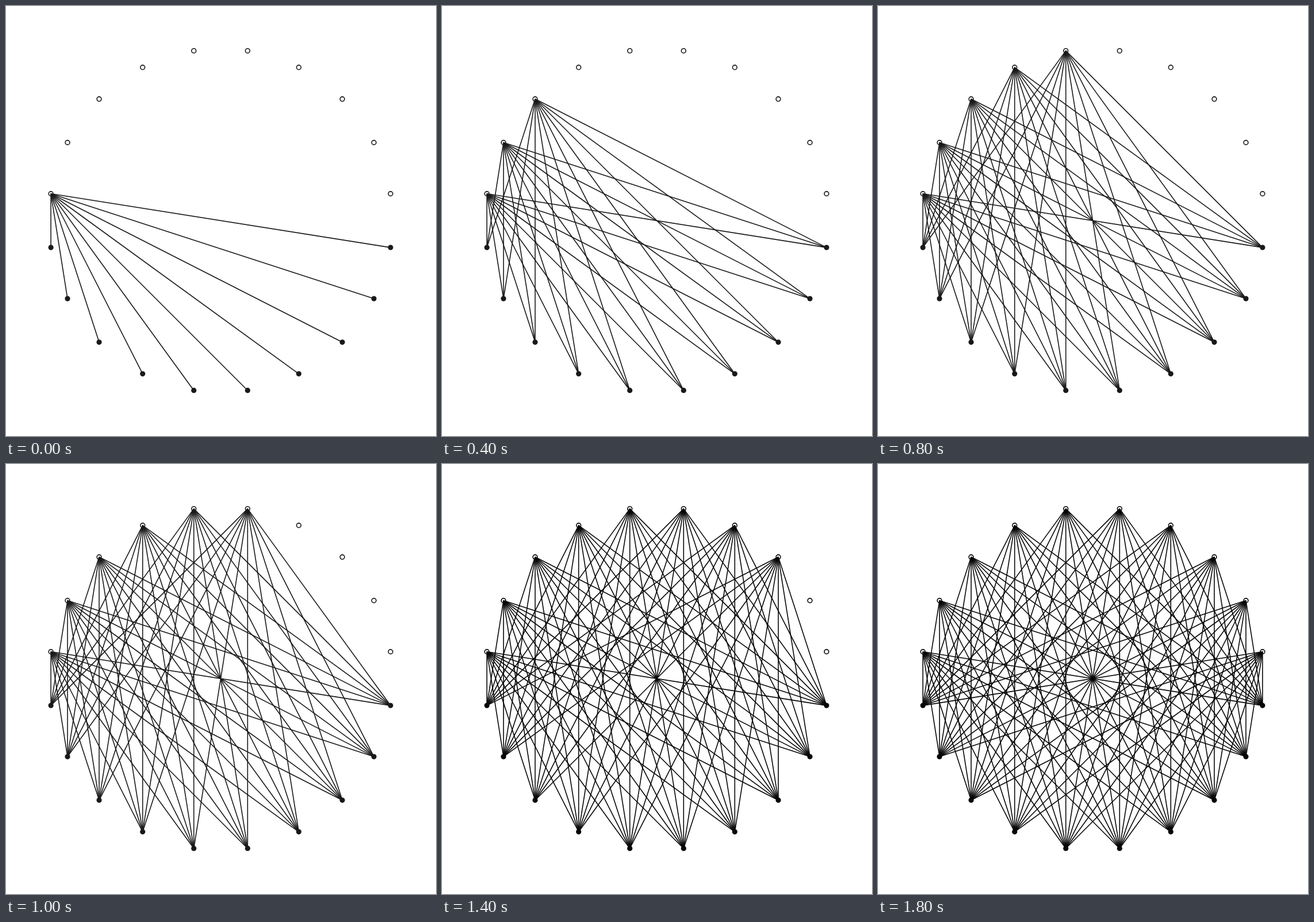
Write an HTML page with a canvas that moves like this. It is 748 px wide and 748 px high and loops after 2 s.

```html
<!DOCTYPE html>
<html lang="en">
<head>
<meta charset="utf-8">
<title>Connected circle</title>
<style>
  html, body { margin: 0; width: 100%; height: 100%; overflow: hidden; background: #fff; }
  canvas { display: block; }
</style>
</head>
<body>
<canvas id="stage" width="748" height="748"></canvas>
<script>
const ctx = document.getElementById("stage").getContext("2d");
const SIZE = 748, CENTER_X = 373.5, CENTER_Y = 373.3, RADIUS = 299.1;
const HALF = 10, STEP = 200;

// Evenly spaced points, clockwise from just above the left end of the circle.
const points = Array.from({ length: 2 * HALF }, (_, i) => {
  const angle = Math.PI * (1 + (i + 0.5) / HALF);
  return [CENTER_X + RADIUS * Math.cos(angle), CENTER_Y + RADIUS * Math.sin(angle)];
});
const sources = points.slice(0, HALF);
const targets = points.slice(HALF);

function dot([x, y], radius) {
  ctx.beginPath();
  ctx.arc(x, y, radius, 0, 2 * Math.PI);
}

function drawFan(source) {
  for (const target of targets) {
    ctx.beginPath();
    ctx.moveTo(...source);
    ctx.lineTo(...target);
    ctx.stroke();
  }
}

function draw(now) {
  const step = Math.floor(now / STEP) % HALF;
  ctx.fillStyle = "#fff";
  ctx.fillRect(0, 0, SIZE, SIZE);
  // The ink turns darker once the web gets dense.
  ctx.fillStyle = ctx.strokeStyle = step < 6 ? "#1a1819" : "#060606";
  ctx.lineWidth = 1.6;
  for (const p of sources) { dot(p, 3.9); ctx.stroke(); }
  for (const p of targets) { dot(p, 4.6); ctx.fill(); }
  sources.slice(0, step + 1).forEach(drawFan);
}

const start = performance.now();
function tick() {
  draw(performance.now() - start);
  requestAnimationFrame(tick);
}
tick();
</script>
</body>
</html>
```
